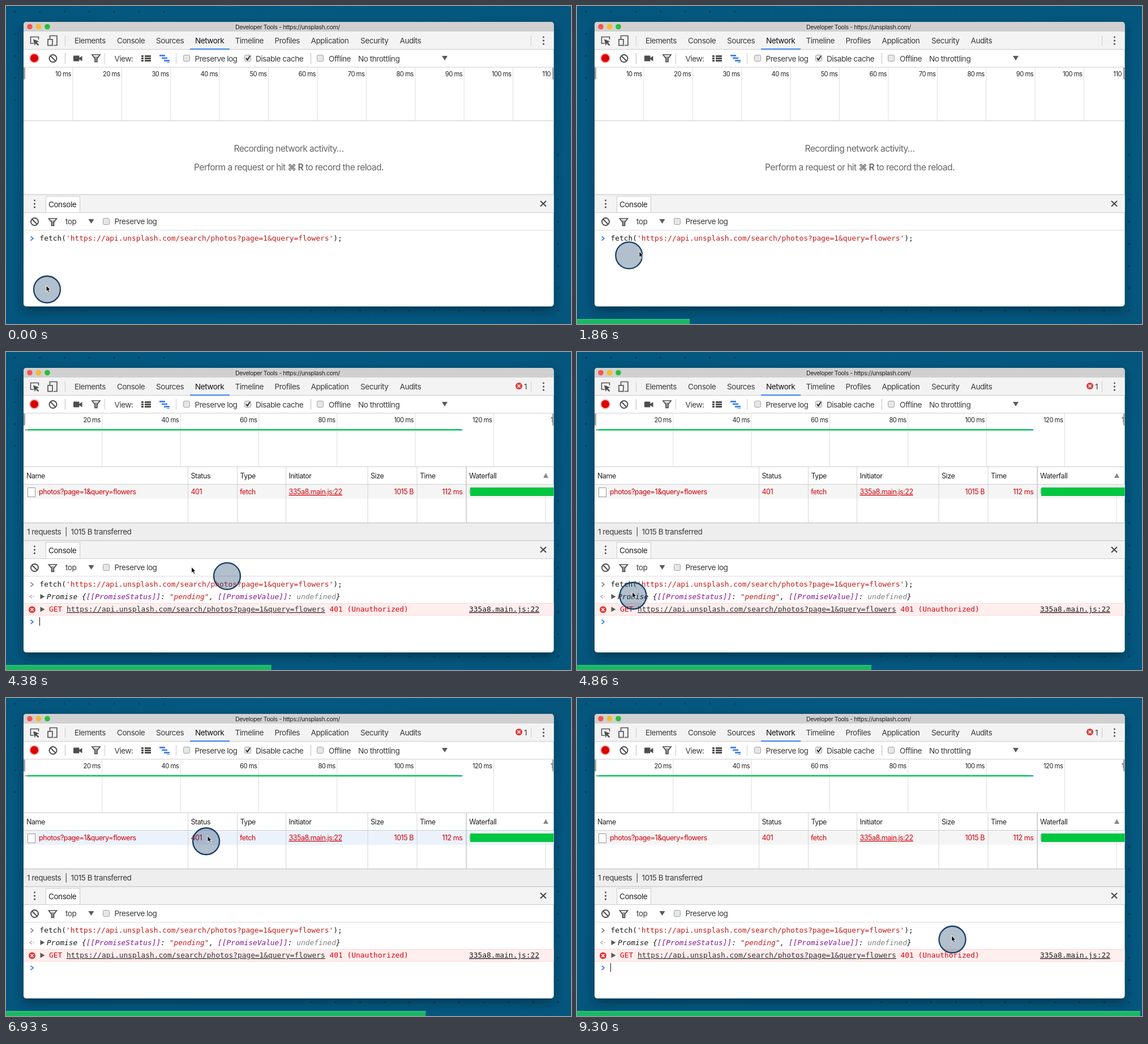
An HTML page for the animation above (9330 ms loop, 998x561 px).

```html
<!DOCTYPE html>
<html lang="en">
<head>
<meta charset="utf-8">
<title>Network panel</title>
<style>
html, body { margin: 0; width: 100%; height: 100%; overflow: hidden; background: #04587f; }
svg { display: block; width: 998px; height: 561px; }
text { font: 13.6px Inter, Roboto, sans-serif; letter-spacing: -.036em; fill: #3b3b3b; white-space: pre; }
.title { font-size: 10.5px; fill: #222; }
.tick { font-size: 11.2px; fill: #222; text-anchor: end; letter-spacing: -.045em; }
.cell { font-size: 12.5px; fill: #222; }
.fail { fill: #d2000a; }
.hint { font-size: 15.6px; fill: #666; text-anchor: middle; }
.code { font: 12.86px "DejaVu Sans Mono", "Liberation Mono", monospace; letter-spacing: 0; fill: #1a1a1a; }
.end { text-anchor: end; }
.link { text-decoration: underline; }
</style>
</head>
<body>
<svg id="stage" viewBox="0 0 998 561"></svg>
<script>
const LOOP = 9330, ENTER = 3210, REPLY = 3360, LEAD = 22;
const stage = document.getElementById('stage');

const text = (x, y, s, cls = '', more = '') => `<text x="${x}" y="${y}" class="${cls}" ${more}>${s}</text>`;
const rect = (x, y, w, h, fill, more = '') => `<rect x="${x}" y="${y}" width="${w}" height="${h}" fill="${fill}" ${more}/>`;
const path = (d, stroke = '#4d4d4d', width = 1, fill = 'none') =>
  `<path d="${d}" stroke="${stroke}" stroke-width="${width}" fill="${fill}"/>`;
const fillPath = (d, fill = '#4d4d4d') => path(d, 'none', 0, fill);
const disc = (x, y, r, fill, more = '') => `<circle cx="${x}" cy="${y}" r="${r}" fill="${fill}" ${more}/>`;
const vline = (x, y1, y2, color = '#ccc') => path(`M${x} ${y1}V${y2}`, color);
const hline = (y, color = '#ccc') => path(`M31 ${y}H967.5`, color);
const group = (id, body) => `<g id="${id}">${body}</g>`;
const span = (s, fill) => `<tspan fill="${fill}">${s}</tspan>`;
const range = (n, f) => Array.from({ length: n }, (_, i) => f(i)).join('');

const dots = (x, y) => disc(x, 55 + y, 1.4, '#4d4d4d') + disc(x, 61 + y, 1.6, '#4d4d4d') + disc(x, 67 + y, 1.6, '#4d4d4d');
const noEntry = (x, y) => disc(x, y, 6.5, 'none', 'stroke="#4d4d4d" stroke-width="2"') +
  path(`M${x - 4.5} ${y - 4.5}l9 9`, '#4d4d4d', 2);
const funnel = (x, y) => path(`M${x - 7} ${y - 6}h14l-5 6.500v6h-4v-6z`, '#4d4d4d', 1.7) +
  fillPath(`M${x - 5} ${y - 3}h10l-3 4v5h-4v-5z`, '#4d4d4d88');
const checkBox = (x, y, on) => rect(x + .5, y + .5, 11, 11, '#e6e6e6', 'rx="2" stroke="#a0a0a0"') +
  (on ? path(`M${x + 3} ${y + 6}l2.500 3l4.500 -7`, '#333', 2) : '');
const downArrow = (x, y) => fillPath(`M${x - 5} ${y - 4}h10l-5 8z`, '#5a5a5a');
const chevron = (x, y, color) => path(`M${x} ${y - 3.6}l4.500 3.700l-4.500 3.700`, color, 1.8);
const expander = y => fillPath(`M60.500 ${y - 4.5}v9l8 -4.500z`, '#5a5a5a');
const errorIcon = (x, y) => disc(x, y, 6, '#dd3a37') + path(`M${x - 2.5} ${y - 2.5}l5 5m0 -5l-5 5`, '#fff', 1.5);

const backdrop = () => rect(0, 0, 998, 561, 'url(#back)') +
  range(7, i => disc(16 + 43.8 * i, 10, 2, '#034566')) +
  range(4, i => disc(16, 49 + 39 * i, 2, '#034566')) +
  range(11, i => disc(975 - 43.7 * i, 537, 2, '#034566')) +
  range(7, i => disc(975, 498 - 39.2 * i, 2, '#034566'));

const tabs = [[121, 'Elements'], [196, 'Console'], [265, 'Sources'], [334, 'Network'], [404.5, 'Timeline'],
  [474.5, 'Profiles'], [538.5, 'Application'], [626, 'Security'], [695.5, 'Audits']];

const chrome = () =>
  rect(31, 28, 936.5, 502, '#fff', 'rx="5" filter="url(#shadow)"') +
  fillPath('M31 45V33a5 5 0 0 1 5 -5H962.500a5 5 0 0 1 5 5V45z', '#d0d0d0') +
  disc(42, 36.5, 4.8, '#f6544d') + disc(57.5, 36.5, 4.8, '#f8b92c') + disc(73, 36.5, 4.8, '#25c138') +
  text(405, 40.5, 'Developer Tools - https://unsplash.com/', 'title') +
  rect(31, 45, 936.5, 32, '#f3f3f3') + hline(76.5) +
  tabs.map(([x, s]) => text(x, 65.5, s, '', s == 'Network' ? 'style="fill:#111"' : '')).join('') +
  rect(325, 75, 70, 2, '#3f80ea') +
  path('M49 66H43.500V54.500H57.500V59', '#555', 1.6) +
  fillPath('M48 58.500l10.500 4l-4.200 1.700l4 4l-1.800 1.800l-4 -4l-1.700 4.300z') +
  path('M77.500 58V52.500H90V69.500H84', '#555', 1.7) + rect(74, 59, 8, 10.5, '#f3f3f3', 'stroke="#555" stroke-width="1.7"') +
  vline(104.5, 52, 70) + vline(927.5, 52, 70) + dots(949.5, 0) +
  disc(50, 92, 9, '#f9b5b5') + disc(50, 92, 7, '#d90000') + noEntry(83, 92.5) + vline(104.5, 83, 102, '#bbb') +
  rect(119, 87.5, 10.5, 10, '#4d4d4d', 'rx="1"') + fillPath('M129 92l5.500 -4v9.500l-5.500 -4z') +
  funnel(159, 92) + vline(174.5, 83, 102) + text(191.5, 97.5, 'View:') +
  range(3, i => rect(239, 87 + 4 * i, 4, 3, '#4d4d4d') + rect(245, 87 + 4 * i, 11, 3, '#4d4d4d')) +
  range(3, i => rect(271 + 4 * i, 86 + 4.5 * i, 10, 2.8, '#3f80ea')) + rect(284, 99, 5, 1, '#3f80ea') +
  vline(300.5, 83, 102) + checkBox(313, 86) + text(333.5, 97.5, 'Preserve log') +
  checkBox(421, 86, true) + text(441, 97.5, 'Disable cache') + vline(538.5, 83, 102, '#bbb') +
  checkBox(549, 86) + text(570, 97.5, 'Offline') + text(622, 97.5, 'No throttling') + downArrow(775, 92) +
  hline(108) + hline(202.5);

const ruler = (step, unit, count, last) =>
  range(count, i => vline(31.5 + step * (i + 1), 108, 202, '#ddd') +
    text(28.5 + step * (i + 1), 124, `${unit * (i + 1)} ms`, 'tick')) + last;

const heads = [[36, 'Name'], [326.5, 'Status'], [413.5, 'Type'], [499.5, 'Initiator'], [644, 'Size'], [731, 'Time'], [818, 'Waterfall']];
const table = () =>
  group('row', rect(31, 234, 936.5, 25, '#f5f5f5', 'id="rowFill"')) +
  heads.map(([x, s]) => text(x, 222.5, s, 'cell') + (x > 36 ? vline(x - 5, 203, 301, x > 800 ? '#aaa' : '#d4d4d4') : '')).join('') +
  hline(233.5) + fillPath('M949 222h9l-4.500 -8.500z', '#888') +
  rect(31, 301, 936.5, 32, '#eeeeee') + hline(301.5, '#bbb');

const rowData = () =>
  rect(38.5, 239.5, 13, 16, '#fff', 'stroke="#999"') +
  text(58, 251, 'photos?page=1&amp;query=flowers', 'cell fail') + text(326.5, 251, '401', 'cell fail') +
  text(413, 251, 'fetch', 'cell fail') + text(499.5, 251, '335a8.main.js:22', 'cell fail link') +
  text(720, 251, '1015 B', 'cell fail end') + text(806.5, 251, '112 ms', 'cell fail end') +
  vline(953, 234, 301, '#ddd') + rect(818, 241, 3, 9, '#ccc') + rect(820, 239, 147.5, 15, '#00c641');

const drawer = () =>
  hline(333, '#aaa') + rect(31, 333.5, 936.5, 30.5, '#f3f3f3') + hline(364.5) + dots(50.5, 288) +
  rect(70.5, 336, 60, 28.5, '#fff', 'stroke="#ccc"') + text(75, 354.5, 'Console', '', 'style="fill:#222"') +
  path('M944 344l10 9.500m0 -9.500l-10 9.500', '#444', 2) +
  noEntry(50.5, 380.5) + funnel(82.5, 381) + text(105, 385, 'top') + downArrow(150.500, 380) +
  checkBox(171, 374) + text(191.5, 385, 'Preserve log') + hline(395.5, '#ddd');

const url = 'https://api.unsplash.com/search/photos?page=1&amp;query=flowers';
const log = () =>
  expander(431.5) + path('M46 428.500l-4 3l4 3', '#aaa', 1.4) + disc(48.5, 431.5, 1, '#aaa') +
  text(72, 436, 'Promise {' + span('[[PromiseStatus]]', '#881391') + ': ' + span('"pending"', '#c41a16') + ', ' +
    span('[[PromiseValue]]', '#881391') + ': ' + span('undefined', '#808080') + '}', 'code', 'font-style="italic" style="font-style:italic"') +
  rect(31, 443, 936.5, 22, '#ffeeee') + hline(443.5, '#ffd6d6') + hline(464.5, '#ffd6d6') +
  errorIcon(46, 454.5) + expander(454) +
  text(76, 458, span('GET ', '#e0000a') + `<tspan class="link" fill="#333">${url}</tspan>` +
    span(' 401 (Unauthorized)', '#e0000a'), 'code') +
  text(818, 458, '335a8.main.js:22', 'code link');

stage.innerHTML = `<defs>
  <radialGradient id="back" r=".75"><stop offset="0" stop-color="#055f89"/><stop offset="1" stop-color="#04557c"/></radialGradient>
  <filter id="shadow" x="-10%" y="-10%" width="120%" height="125%"><feDropShadow dx="0" dy="8" stdDeviation="9" flood-color="#00202f" flood-opacity=".55"/></filter>
</defs>` +
  backdrop() + chrome() +
  group('idle', text(499.5, 257, 'Recording network activity…', 'hint') +
    text(499.5, 290, 'Perform a request or hit <tspan font-weight="600">⌘ R</tspan> to record the reload.', 'hint')) +
  group('shortRuler', ruler(86.4, 10, 10, text(962, 124, '110', 'tick'))) +
  group('longRuler', ruler(138.3, 20, 6, text(966, 124, '1', 'tick')) +
    rect(33, 136, 6, 2.5, '#aaa') + rect(38, 136, 764, 2.5, '#00c853') + rect(801, 136, 5, 2.5, '#2a9fd0')) +
  rect(31, 108.5, 3, 21, '#a0a0a0') + rect(965, 108.5, 2.5, 21, '#a0a0a0') +
  group('requests', table() + text(37, 321.5, '', '', 'id="summary"')) +
  group('reply', rowData() + errorIcon(906, 60) + text(915, 65.5, '1') + log()) +
  drawer() +
  group('typing', chevron(43.500, 410, '#3a80f0')) +
  group('sent', chevron(43.500, 410, '#8a8a8a')) +
  text(59.5, 413.5, `fetch(${span("'" + url + "'", '#c41a16')});`, 'code') +
  group('prompt', chevron(43.500, 0, '#3a80f0')) +
  rect(0, 0, 1, 15, '#111', 'id="caret"') +
  group('tip', rect(341.5, 263.5, 119, 29, '#f4f4f4', 'rx="2" stroke="#bbb"') + text(351, 283, '401 Unauthorized', 'cell')) +
  disc(0, 0, 23.5, 'rgba(23,61,105,.33)', 'id="halo" stroke="#1b3f66" stroke-width="2.3"') +
  group('pointer', path('M0 0V11l2.500 -2.300l1.800 4l2 -.9l-1.800 -3.900h3.300z', '#fff', 1, '#111')) +
  group('progress', rect(0, 552.5, 1, 8.5, '#19b863', 'id="bar"') + rect(0, 552.5, 1, 1, '#3ee08c', 'id="barTop"'));

const el = Object.fromEntries([...stage.querySelectorAll('[id]')].map(e => [e.id, e]));
const show = (name, on) => { el[name].style.display = on ? '' : 'none'; };
const place = (name, x, y) => el[name].setAttribute('transform', `translate(${x} ${y})`);

// Each move: start, duration, end x, end y
const moves = [[250, 450, 82.5, 440], [1832, 320, 650, 435], [4259, 210, 250, 374],
  [4480, 300, 99, 430], [6500, 480, 359, 249], [8340, 400, 663, 426]];
const ease = u => u < .5 ? 2 * u * u : 1 - 2 * (1 - u) ** 2;
function position(t) {
  let x = 72.5, y = 500;
  for (const [start, length, toX, toY] of moves) {
    const k = ease(Math.min(1, Math.max(0, (t - start) / length)));
    x += (toX - x) * k;
    y += (toY - y) * k;
  }
  return [x, y];
}

function draw(t) {
  const sent = t >= ENTER, done = t >= REPLY;
  show('idle', !sent);
  show('typing', !sent);
  show('sent', sent);
  show('requests', sent);
  show('prompt', sent);
  show('reply', done);
  show('row', done);
  show('shortRuler', !done);
  show('longRuler', done);
  el.summary.textContent = `1 requests  |  ${done ? '1015 B' : '0 B'} transferred`;

  const promptY = done ? 476 : 431;
  place('prompt', 0, promptY);
  place('caret', sent ? 59 : 594, sent ? promptY - 8 : 402);
  const blink = t % 1000;
  show('caret', blink >= 40 && blink < 540);

  const [x, y] = position(t), [px, py] = position(t + LEAD);
  place('halo', x, y);
  place('pointer', px - 1.5, py - 7);
  show('pointer', !sent || t >= 4240);
  el.rowFill.setAttribute('fill', py - 7 > 234 && py - 7 < 259 ? '#ebf2fc' : '#f5f5f5');
  show('tip', t >= 7500 && t < 8360);

  const width = 998 * t / LOOP;
  el.bar.setAttribute('width', width);
  el.barTop.setAttribute('width', width);
}

const begin = performance.now();
function frame() {
  draw((performance.now() - begin) % LOOP);
  requestAnimationFrame(frame);
}
frame();
</script>
</body>
</html>
```
